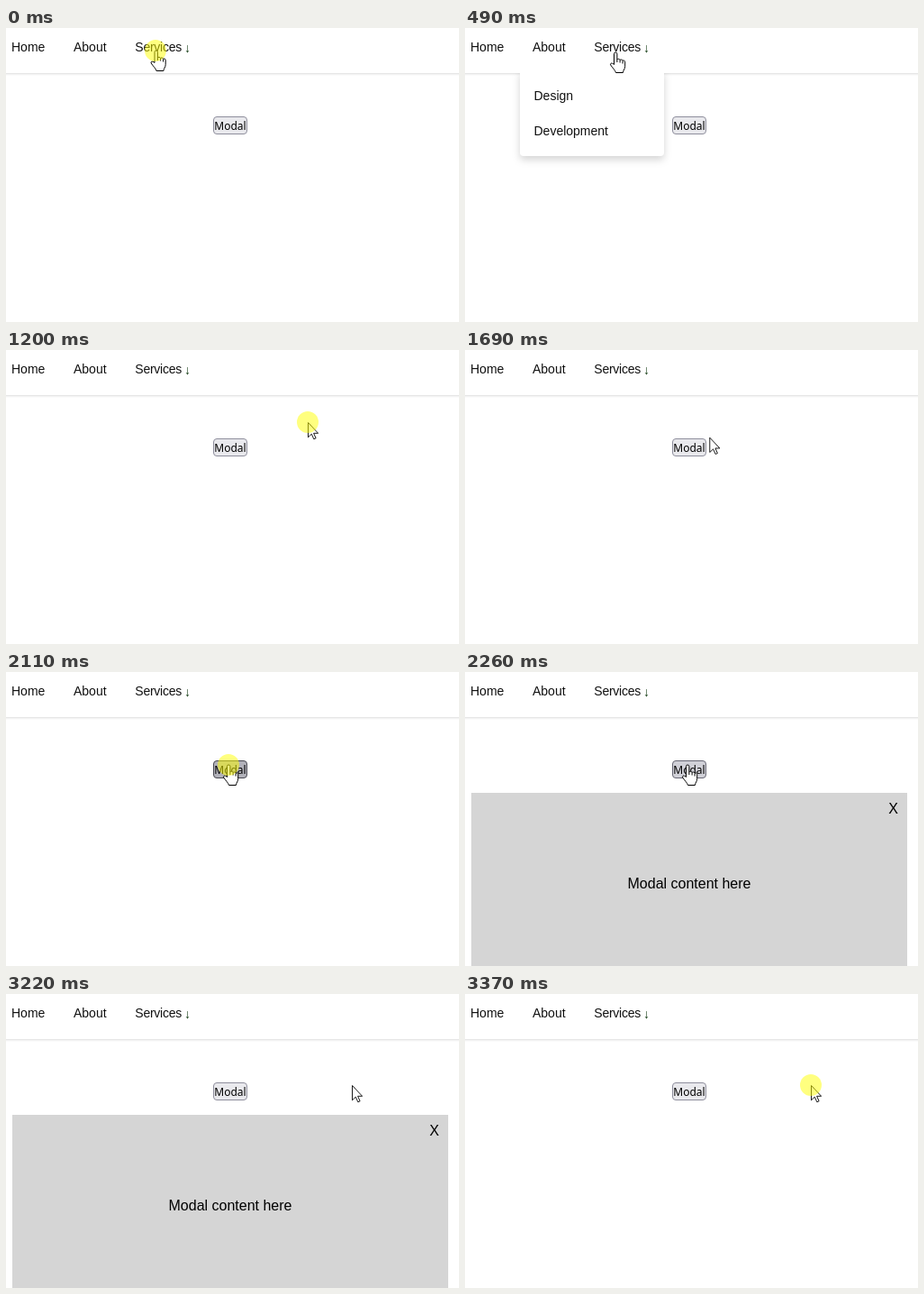
An HTML page that plays this animation: 503x326 px, repeating every 3450 ms.

```html
<!DOCTYPE html>
<html lang="en">
<head>
<meta charset="utf-8">
<title>Menu and modal</title>
<style>
html, body { margin: 0; width: 100%; height: 100%; overflow: hidden; background: #fff; }
svg { display: block; }
text { font: 14px "Liberation Sans", Arial, sans-serif; fill: #111; }
#menu rect { filter: drop-shadow(0 4px 4px rgba(0, 0, 0, .17)); }
#modal text { font-size: 16px; fill: #000; }
#button text { font: 12px "Noto Sans", "DejaVu Sans", sans-serif; fill: #000; }
#cursor path { fill: #fff; stroke: #000; stroke-linejoin: round; }
</style>
</head>
<body>
<svg width="503" height="326" viewBox="0 0 503 326">
  <clipPath id="below"><rect y="50" width="503" height="276"/></clipPath>
  <g id="nav">
    <rect y="50" width="503" height="1" fill="#e6e6e6"/>
    <rect y="51" width="503" height="1" fill="#f3f3f3"/>
    <rect y="52" width="503" height="1" fill="#fbfbfb"/>
    <text x="6" y="26">Home</text>
    <text x="75" y="26">About</text>
    <text x="143.3" y="26" letter-spacing="-.25">Services</text>
    <text x="201.5" y="27" text-anchor="middle" style="fill:#143c14">↓</text>
  </g>
  <g id="button">
    <rect id="face" x="230.5" y="98.5" width="37" height="19" rx="3.5"/>
    <text x="249" y="113" text-anchor="middle">Modal</text>
  </g>
  <g id="menu" clip-path="url(#below)">
    <rect x="61" y="46" width="160" height="96" rx="4" fill="#fff"/>
    <text x="76.5" y="80">Design</text>
    <text x="76.5" y="119">Development</text>
  </g>
  <g id="modal">
    <rect x="7" y="134" width="484" height="192" fill="#d5d5d5"/>
    <text x="249" y="240" text-anchor="middle">Modal content here</text>
    <text x="470.3" y="157">X</text>
  </g>
  <g id="cursor">
    <path id="arrow" stroke-width=".9" d="M.5 .5V16.8l3.8-3.6 2.5 5.6 2.3-1-2.5-5.5h5z"/>
    <g id="hand">
      <path d="M-1.5 14V2.2a1.7 1.7 0 0 1 3.4 0V8.5c.3-1 3-1 3.2.6c.3-1 2.8-.8 3 .8c.4-.8 2.6-.6 2.6 1.4V16c0 3-2 4-2.3 7H.5c-.5-2.5-4-5.5-5.8-8.5c-.8-2 1.6-2.8 3.8-.5z"/>
      <path d="M1.9 8.5v3M5.1 9v3M8.1 10v3" style="fill:none"/>
    </g>
  </g>
  <circle id="glow" r="12" fill="#ff0" fill-opacity=".5"/>
</svg>
<script>
const LOOP = 3450;
const el = id => document.getElementById(id);
const show = (id, on) => el(id).style.display = on ? "" : "none";
const within = (t, a, b) => t >= a && t < b;
const ease = p => p * p * (3 - 2 * p);
const lerp = (a, b, p) => a + (b - a) * p;

// Index of the current step among n evenly spaced ones from a to b.
const step = (t, a, b, n) => Math.min(n - 1, Math.floor((t - a + 6) / (b - a) * (n - 1)));

function pointer(t) {
  if (t < 490) return [166.5, 24.5];
  if (t < 1370) {
    const p = ease(step(t, 490, 900, 6) / 5);
    return [lerp(167, 335, p), lerp(26.5, 80, p)];
  }
  if (t < 1940) {
    const p = ease(step(t, 1370, 1860, 7) / 6);
    return [lerp(335, 249, p), lerp(80, 102.5, p)];
  }
  if (t < 2580) return [247, 102.5];
  if (t < 3130) {
    const p = ease((step(t, 2580, 3050, 7) + 1) / 7);
    return [lerp(247, 384, p), 102.5 + 160 * p * (1 - p)];
  }
  return [384, t < 3220 ? 102 : 101];
}

function render(t) {
  const [x, y] = pointer(t);
  const pressed = within(t, 2110, 2260);
  const hover = within(x, 230, 268) && within(y, 98, 118);
  const link = x < 206 && y < 40;
  const [fill, stroke] = pressed ? ["#b1b1b9", "#484851"]
    : hover ? ["#d0d0d7", "#676774"] : ["#e9e9ed", "#8f8f9d"];
  el("face").setAttribute("fill", fill);
  el("face").setAttribute("stroke", stroke);
  show("menu", within(t, 170, 1200));
  show("modal", within(t, 2260, 3370));
  show("hand", hover || link);
  show("arrow", !hover && !link);
  show("glow", t < 170 || within(t, 1200, 1370) || pressed || t >= 3370);
  el("cursor").setAttribute("transform", `translate(${x} ${y})`);
  el("glow").setAttribute("transform", `translate(${Math.floor(x)} ${Math.round(y)})`);
}

const start = performance.now();
function tick() {
  render((performance.now() - start) % LOOP);
  requestAnimationFrame(tick);
}
tick();
</script>
</body>
</html>
```
